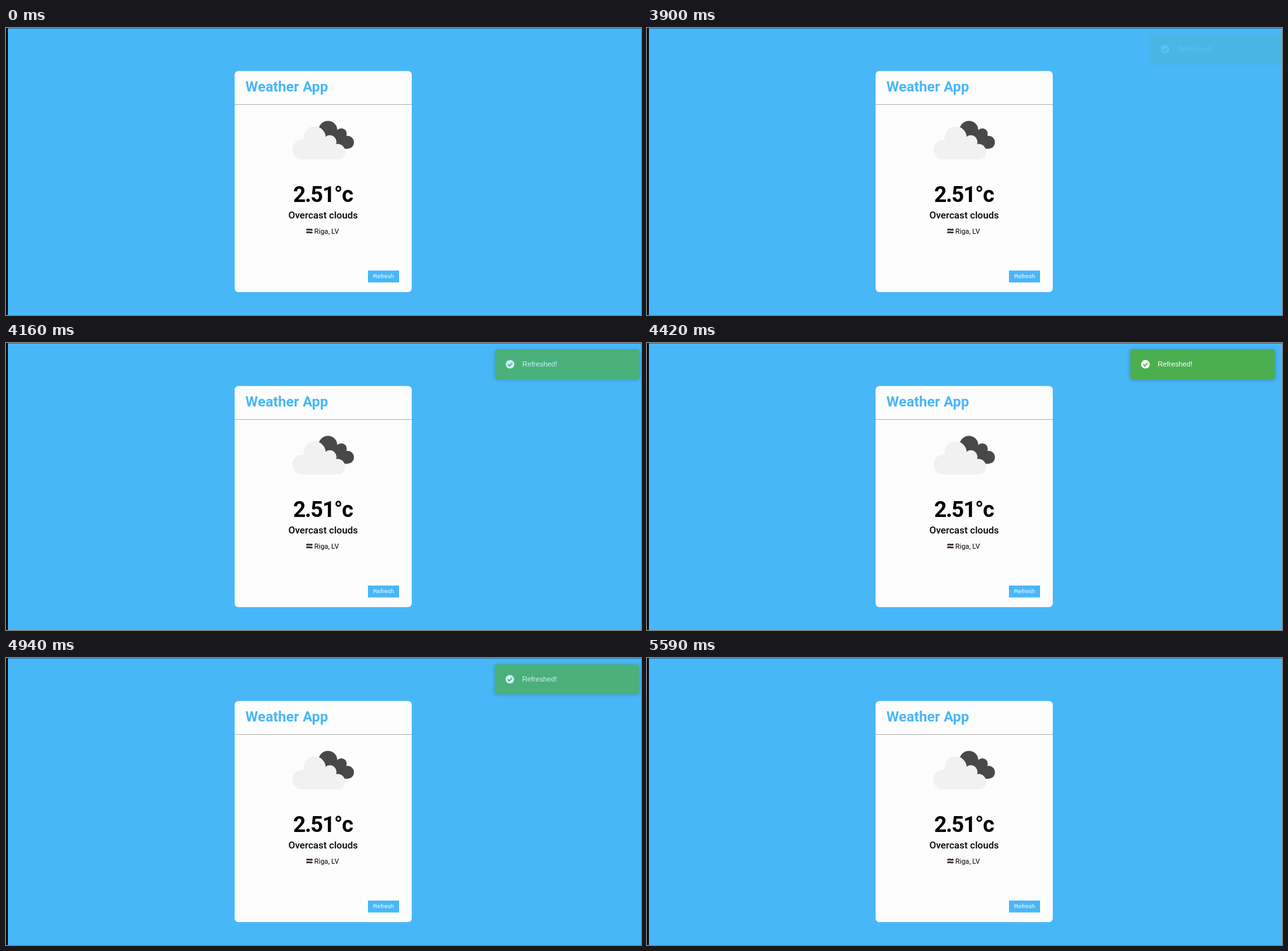
Recreate the animation shown at these times as an HTML page. Size 1000 px wide and 452 px high, loop 5980 ms.

```html
<!DOCTYPE html>
<html lang="en">
<head>
<meta charset="utf-8">
<title>Weather App</title>
<style>
  html, body { margin: 0; width: 100%; height: 100%; overflow: hidden; background: #48b7f8; }
  svg { display: block; width: 1000px; height: 452px; }
  text { font-family: Roboto, "Open Sans", sans-serif; }
  .ui { font-family: "Liberation Sans", Arial, sans-serif; fill: #fff; }
  .mid { text-anchor: middle; }
  #toast rect { filter: drop-shadow(0 1px 3px rgba(0, 0, 0, .25)); }
</style>
</head>
<body>
<svg viewBox="0 0 1000 452">
  <rect width="1000" height="452" fill="#48b7f8"/>
  <rect width="1000" height="1" fill="#286a91"/>
  <rect width="3" height="452" fill="#05080b"/>

  <rect x="360" y="67.7" width="279" height="348.3" rx="6" fill="#fdfdfd"/>
  <rect x="360" y="120" width="279" height="1" fill="#b4b4b4"/>
  <text x="377" y="99.5" font-size="22.6" font-weight="700" fill="#48b7f8">Weather App</text>

  <g fill="#484848">
    <circle cx="507" cy="161" r="14.7"/>
    <circle cx="528" cy="166.7" r="8.7"/>
    <circle cx="537.8" cy="180" r="10.2"/>
    <path d="M496 165L528 162L538 190.2H520Z"/>
  </g>
  <g fill="#f1f1f1">
    <circle cx="486" cy="172.5" r="17.5"/>
    <circle cx="510" cy="179.3" r="10.5"/>
    <circle cx="466.5" cy="191.5" r="15.5"/>
    <circle cx="522" cy="194.8" r="12.2"/>
    <path d="M466 176H518L522 207H466Z"/>
  </g>

  <text class="mid" x="499" y="273.7" font-size="34.5" font-weight="700" letter-spacing="-1.2">2.51°c</text>
  <text class="mid" x="499.4" y="299.7" font-size="15.2" font-weight="500">Overcast clouds</text>
  <g fill="none" stroke="#3b2a2e" stroke-width="2.7">
    <path d="M473 318q2.5-1.2 5-.5t4.5-.5"/>
    <path d="M473 322.3q2.5-1.2 5-.5t4.5-.5"/>
  </g>
  <text x="485.6" y="323.7" font-size="11.1">Riga, LV</text>

  <rect id="button" x="570" y="382" width="49" height="18.7"/>
  <text class="ui mid" x="594.5" y="394.4" font-size="9.4">Refresh</text>

  <g id="toast">
    <rect x="761" y="10" width="227.5" height="47" rx="4" fill="#4caf50"/>
    <circle cx="784.7" cy="33.5" r="6.8" fill="#fff"/>
    <path d="M781.4 33.7l2.4 2.4l4.4-4.6" fill="none" stroke="#4caf50" stroke-width="1.8"/>
    <text class="ui" x="804" y="37.4" font-size="11.25">Refreshed!</text>
  </g>
</svg>
<script>
  const LOOP = 5980, STEP = 130, SLIDE = 35, FADE = 600;
  const PRESS = 650, DONE = 3900, ENTER = 3866, LEAVE = 4860;
  const button = document.getElementById("button");
  const toast = document.getElementById("toast");

  const easeOut = (t, start) => {
    const p = Math.min(1, Math.max(0, (t - start) / FADE));
    return 1 - (1 - p) ** 2;
  };

  function draw(now) {
    // The picture advances in fixed steps.
    const t = Math.floor((now % LOOP) / STEP) * STEP;
    const shown = easeOut(t, ENTER) - easeOut(t, LEAVE);
    button.setAttribute("fill", t >= PRESS && t < DONE ? "#dadada" : "#48b7f8");
    toast.setAttribute("opacity", shown);
    toast.setAttribute("transform", `translate(${SLIDE * (1 - shown)} 0)`);
  }

  const start = performance.now();
  function tick() {
    draw(performance.now() - start);
    requestAnimationFrame(tick);
  }
  tick();
</script>
</body>
</html>
```
